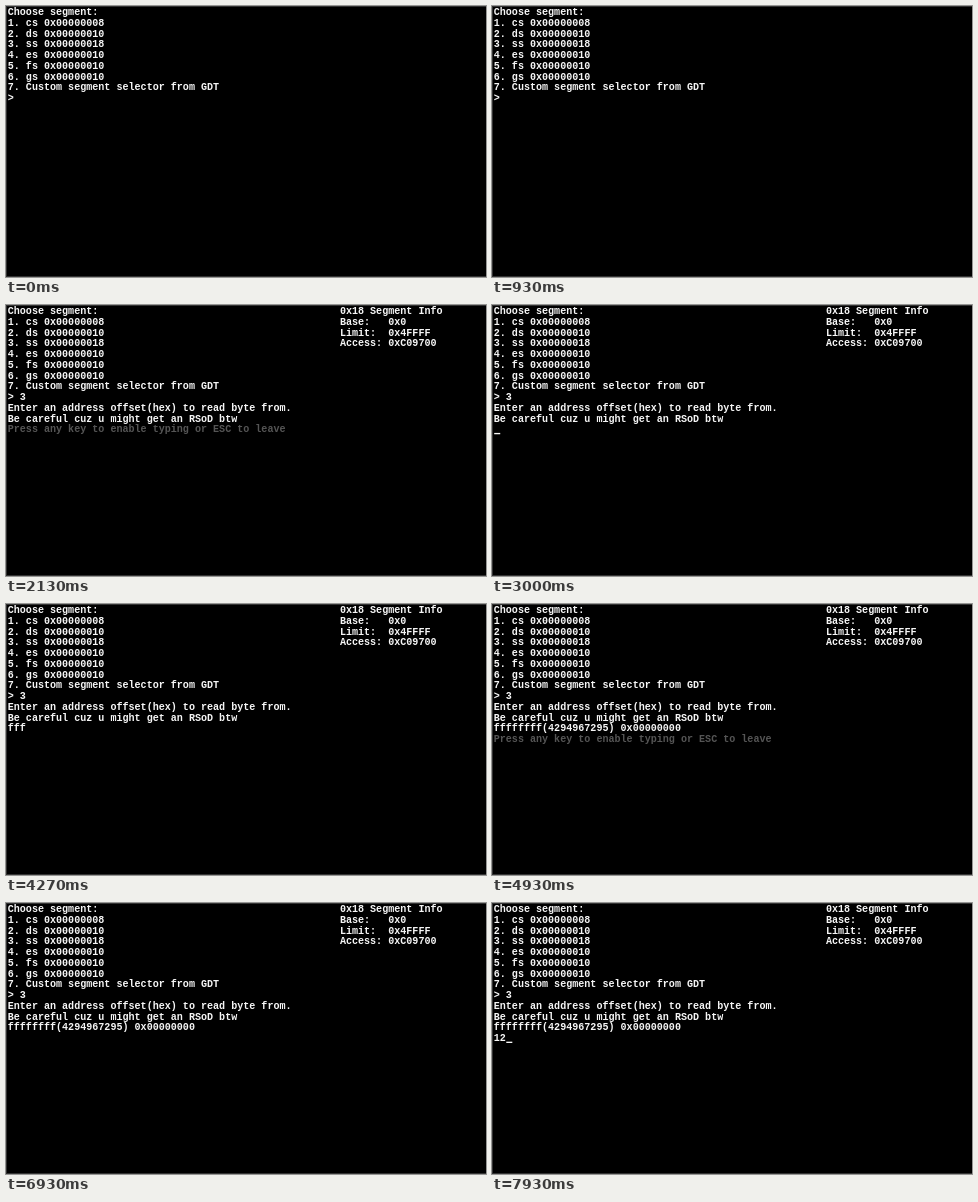
An HTML page with a canvas for the animation above (8 s loop, 480 px wide and 271 px high).

```html
<!DOCTYPE html>
<html lang="en">
<head>
<meta charset="utf-8">
<title>Segment reader</title>
<style>
html, body { margin: 0; width: 100%; height: 100%; overflow: hidden; background: #000; }
canvas { display: block; }
</style>
</head>
<body>
<canvas width="480" height="271"></canvas>
<script>
const ctx = document.querySelector('canvas').getContext('2d');
const LOOP = 8000, WHITE = '#f6f6f6', GREY = '#555';
const CELL_W = 9, CELL_H = 16, SCALE = 0.671;

const MENU = [
  'Choose segment:',
  '1. cs 0x00000008',
  '2. ds 0x00000010',
  '3. ss 0x00000018',
  '4. es 0x00000010',
  '5. fs 0x00000010',
  '6. gs 0x00000010',
  '7. Custom segment selector from GDT'
];
const INFO = ['0x18 Segment Info', 'Base:   0x0', 'Limit:  0x4FFFF', 'Access: 0xC09700'];
const PROMPT = [
  'Enter an address offset(hex) to read byte from.',
  'Be careful cuz u might get an RSoD btw'
];
const HINT = 'Press any key to enable typing or ESC to leave';

// Key and blink times in ms
const F_KEYS = [3930, 4200, 4270, 4330, 4470, 4530, 4600, 4730];
const BLINKS = [130, 400, 670, 930, 1200, 1470, 1730, 2000, 2270, 2530, 2800, 3070,
  3330, 3600, 3930, 4200, 4470, 4730, 5000, 5270, 5530, 5800, 6130, 6400, 6670,
  6930, 7200, 7470, 7730];

const passed = (times, t) => times.filter(x => t >= x).length;

function print(text, col, row, color = WHITE) {
  ctx.fillStyle = color;
  [...text].forEach((ch, i) =>
    ctx.fillText(ch, (col + i) * CELL_W - 0.7, row * CELL_H + 12));
}

const printAll = (lines, col, row) => lines.forEach((s, i) => print(s, col, row + i));

function cursor(col, row, t, color = WHITE) {
  if (passed(BLINKS, t) % 2 === 0) return;
  ctx.fillStyle = color;
  ctx.fillRect(col * CELL_W, row * CELL_H + 13, CELL_W, 2);
}

// A line of input, or the grey hint until a key is pressed
function entry(text, row, t, waiting) {
  if (waiting) print(HINT, 0, row, GREY);
  else print(text, 0, row);
  cursor(waiting ? 0 : text.length, row, t, waiting ? GREY : WHITE);
}

// Black screen with a dim window edge
function clear() {
  ctx.setTransform(1, 0, 0, 1, 0, 0);
  ctx.fillStyle = '#333';
  ctx.fillRect(0, 0, 480, 271);
  ctx.fillStyle = '#000';
  ctx.fillRect(1, 1, 479, 269);
}

function draw(t) {
  clear();
  ctx.setTransform(SCALE, 0, 0, SCALE, 2.2, 1.1);
  ctx.font = 'bold 15px "Liberation Mono", monospace';

  printAll(MENU, 0, 0);
  const choice = t < 1470 ? '> ' : '> 3';
  print(choice, 0, 8);
  if (t < 2130) return cursor(choice.length, 8, t);

  printAll(INFO, 55, 0);
  printAll(PROMPT, 0, 9);
  if (t < 4930) return entry('f'.repeat(passed(F_KEYS, t)), 11, t, t < 3000);

  print('ffffffff(4294967295) 0x00000000', 0, 11);
  entry('12'.slice(0, passed([7730, 7930], t)), 12, t, t < 6270);
}

function frame(now) {
  draw(now % LOOP);
  requestAnimationFrame(frame);
}
draw(0);
requestAnimationFrame(frame);
</script>
</body>
</html>
```
